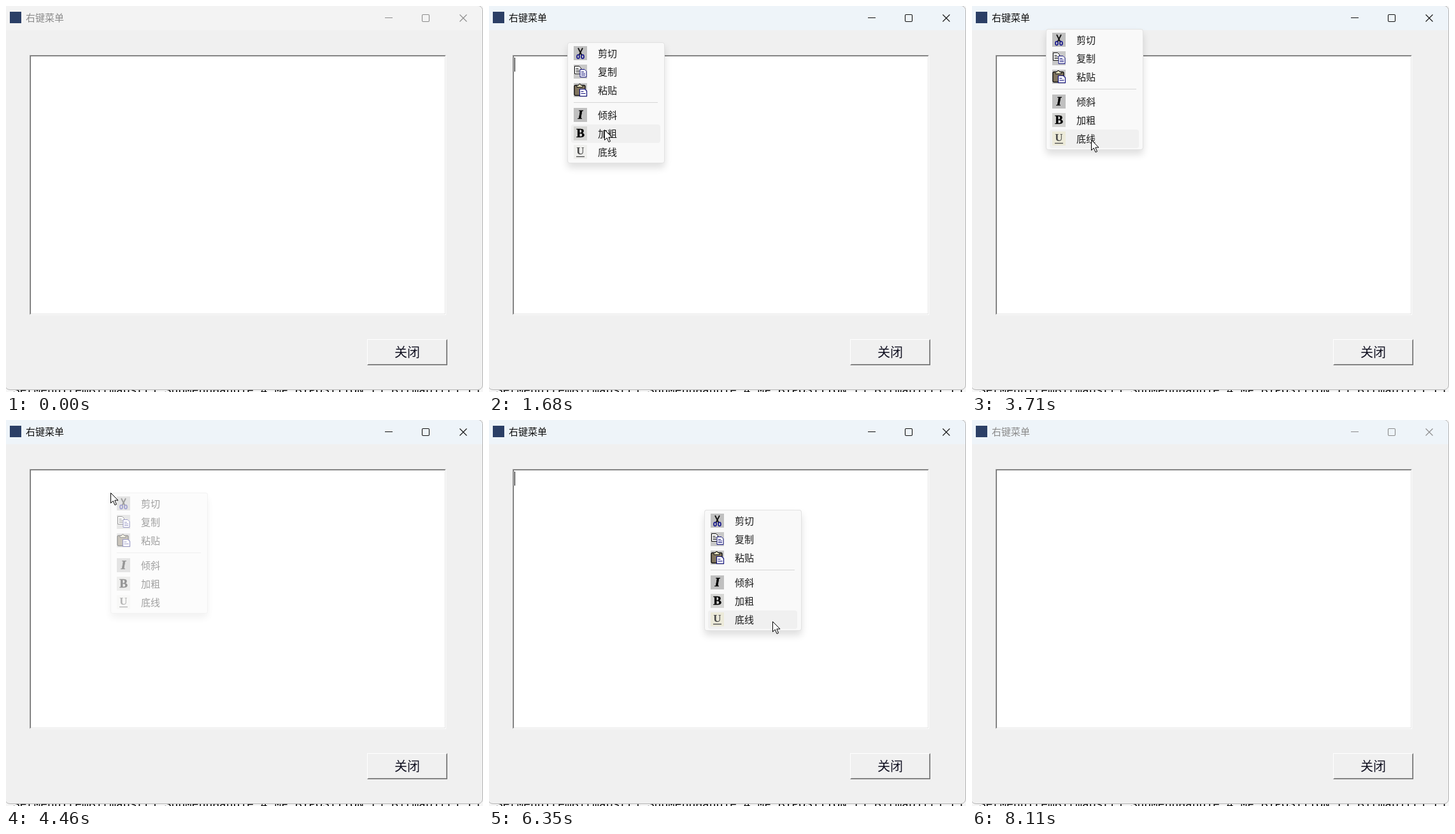
Recreate the animation shown at these times as an HTML page. Size 749 by 606 pixels, loop 8190 ms.

```html
<!DOCTYPE html>
<html lang="zh-CN">
<head>
<meta charset="utf-8">
<title>右键菜单</title>
<style>
html, body { margin: 0; width: 100%; height: 100%; overflow: hidden; background: #f6f6f6; }
body { position: relative; font: 15px "Noto Sans CJK SC", "Noto Sans CJK", sans-serif; color: #111; }
body * { box-sizing: border-box; }
.abs, .row, #menu, #caret, #ptr { position: absolute; }
#code { left: 11px; top: 594px; font: 18px/20px "Liberation Mono", monospace; white-space: pre; color: #000; }
#win { left: -2px; top: -1px; width: 751px; height: 604px; background: #f0f0f0; border: 1px solid #b4b4b4;
  border-radius: 0 8px 8px 8px; overflow: hidden; }
#bar { left: 0; top: 0; width: 100%; height: 38px; background: #eef4f9; }
#name { left: 31px; top: 6px; line-height: 24px; }
#icon { left: 6px; top: 9px; width: 18px; height: 18px; background: #2b3f66; }
#ctl { left: 590px; top: 8px; }
.off { color: #8b8b8b; }
#edit { left: 37px; top: 77px; width: 654px; height: 408px; border: 1px solid; border-color: #a0a0a0 #fff #fff #a0a0a0; }
#edit div { height: 100%; background: #fff; border: 1px solid; border-color: #696969 #e3e3e3 #e3e3e3 #696969; }
#btn { left: 567px; top: 523px; width: 126px; height: 41px; border: 1px solid; border-color: #fff #696969 #696969 #fff; }
#btn div { height: 100%; border: 1px solid; border-color: #f0f0f0 #a0a0a0 #a0a0a0 #f0f0f0;
  font: 300 20px/36px "Noto Sans CJK SC", "Noto Sans CJK", sans-serif; text-align: center; color: #101020; }
#caret { left: 40px; top: 81px; width: 1px; height: 22px; background: #000; }
#menu { left: 0; top: 0; width: 153px; height: 190px; background: #f9f9f9; border-radius: 4px;
  box-shadow: inset 0 0 0 1px #e2e2e2, 0 7px 12px rgba(0,0,0,.13); }
#sep { left: 10px; top: 94px; width: 132px; height: 1px; background: #d6d6d6; }
.row { left: 6px; width: 140px; height: 29px; border-radius: 4px; line-height: 28px; padding-left: 42px; color: #1a1a1a; }
.row svg { position: absolute; left: 4px; top: 3px; }
.row.on { background: #f0f0f0; }
.row.on .warm { fill: #ecead9; }
#menu.ghost { background: none; box-shadow: none; }
.ghost #sep, .ghost .row:not(.on) { visibility: hidden; }
#ptr { left: 0; top: 0; overflow: visible; }
</style>
</head>
<body>
<div id="code" class="abs">SetMenuItemBitmaps(() SubMenuHandle,4,MF_BYPOSITION,() Bitmap1f(),()</div>
<div id="win" class="abs"></div>
<div id="bar" class="abs" style="width:748px;border-radius:0 8px 0 0">
  <div id="icon" class="abs"></div>
  <div id="name" class="abs">右键菜单</div>
  <svg id="ctl" class="abs" width="140" height="22" fill="none" stroke="currentColor" stroke-width="1.1">
    <path d="M5 10.5H17M122.5 5.5l11 11m0-11l-11 11"/>
    <rect x="63.5" y="5.5" width="11" height="11" rx="1.5"/>
  </svg>
</div>
<div id="edit" class="abs"><div></div></div>
<div id="btn" class="abs"><div>关闭</div></div>
<div id="caret"></div>
<div id="menu"><div id="sep" class="abs"></div></div>
<svg id="ptr" width="1" height="1">
  <path id="arrow" d="M.5 .5V16.5L4.2 13L7 19.5L9.5 18.4L6.8 12.1H12Z" fill="#fff" stroke="#000"/>
  <path id="beam" d="M-3 -7.5H-.5M1.5 -7.5H4M.5 -7V7M-3 7.5H-.5M1.5 7.5H4" fill="none" stroke="#000"/>
</svg>
<script>
const LOOP = 8190, FADE = 370, POP = 100;
const $ = id => document.getElementById(id);

const tile = (c, cls = '') => `<rect width="21" height="22" fill="${c}" class="${cls}"/>`;
const glyph = (ch, extra) =>
  `<text x="10.5" y="17" text-anchor="middle" font-family="Liberation Serif, serif" font-weight="bold" font-size="19" ${extra}>${ch}</text>`;
const page = (x, y, c) =>
  `<path d="M${x} ${y}h7l3 3v9h-10z" fill="#fff" stroke="${c}"/><path d="M${x + 2} ${y + 4}h4m-4 2.5h6m-6 2.5h6" stroke="${c}"/>`;

const ITEMS = [
  ['剪切', 3, tile('#c0c0c0') +
    '<path d="M7 3l5.5 11M14 3l-5.5 11" stroke="#111" stroke-width="1.8"/>' +
    '<g fill="none" stroke="#10108a" stroke-width="1.6"><ellipse cx="7" cy="16.5" rx="2" ry="3"/><ellipse cx="14" cy="16.5" rx="2" ry="3"/></g>'],
  ['复制', 32, tile('#c8c8c8') + page(1.5, 2.5, '#111') + page(10, 7.5, '#10107c')],
  ['粘贴', 61, tile('#c8c8c8') +
    '<rect x="1" y="3.5" width="17" height="16" rx="2" fill="#81755f" stroke="#111" stroke-width="1.4"/>' +
    '<path d="M5 6.5v-3h2.500l1-2h2l1 2h2.500v3z" fill="#e4dfbc" stroke="#111"/>' +
    '<path d="M9.500 9.500h8l3 3v8h-11z" fill="#fff" stroke="#10107c" stroke-width="1.2"/><path d="M11.500 13.500h4m-4 3h7" stroke="#10107c"/>'],
  ['倾斜', 100, tile('#c0c0c0') + glyph('I', 'font-style="italic" stroke="#000" stroke-width=".7"')],
  ['加粗', 129, tile('#d6d6d4') + glyph('B', 'stroke="#000" stroke-width=".5"')],
  ['底线', 158, tile('#efefed', 'warm') +
    '<text x="10.5" y="15" text-anchor="middle" font-family="Liberation Serif, serif" font-weight="bold" font-size="17" fill="#4a4a4a">U</text>' +
    '<path d="M4 18.500H17" stroke="#4a4a4a" stroke-width="1.3"/>']
];
const rows = ITEMS.map(([label, top, art]) => {
  const el = document.createElement('div');
  el.className = 'row';
  el.style.top = top + 'px';
  el.innerHTML = `<svg width="22" height="22">${art}</svg>${label}`;
  $('menu').append(el);
  return el;
});

// x, y, opening time, closing time, chosen row
const MENUS = [
  [123, 57, 680, 2390, 2],
  [116, 36, 3215, 3960, 5],
  [164, 114, 4440, 5180, 5],
  [338, 141, 5670, 6420, 5]
];
const CARET = [[620, 2440], [5460, 6520], [7050, 7580]];

// time, x, y of the pointer
const PATH = [
  [120, 690, 596], [600, 123, 57], [700, 123, 57], [880, 242, 211], [1140, 242, 211],
  [1400, 226, 168], [1680, 181, 194], [1810, 181, 194], [1950, 186, 166], [2020, 186, 164],
  [2150, 188, 127], [2350, 188, 127], [2600, 224, 136], [2810, 224, 136], [3170, 116, 36],
  [3250, 116, 36], [3600, 187, 210], [4040, 187, 210], [4390, 164, 114], [4480, 164, 114],
  [4780, 340, 326], [5080, 281, 298], [5340, 281, 298], [5620, 338, 141], [5680, 338, 141],
  [5810, 443, 303], [6010, 443, 303], [6300, 445, 316], [6440, 445, 316], [6770, 605, 517],
  [6840, 605, 517], [7380, 697, 606]
];

function place(t) {
  const i = PATH.findIndex(p => p[0] > t);
  if (i < 1) return null;
  const [t0, x0, y0] = PATH[i - 1], [t1, x1, y1] = PATH[i];
  const u = (t - t0) / (t1 - t0), e = u * u * (3 - 2 * u);
  return [Math.round(x0 + (x1 - x0) * e), Math.round(y0 + (y1 - y0) * e)];
}

function drawMenu(t, pos) {
  const m = MENUS.find(m => t >= m[2] && t < m[3] + FADE), el = $('menu');
  el.style.display = m ? '' : 'none';
  if (!m) return false;
  const [x, y, open, close, pick] = m, ghost = t >= close;
  el.style.transform = `translate(${x}px,${y}px)`;
  el.style.opacity = ghost ? 1 - (t - close) / FADE : Math.min(1, (t - open + 20) / POP);
  el.className = ghost ? 'ghost' : '';
  rows.forEach((row, i) => {
    const dx = pos[0] - x, dy = pos[1] - y - ITEMS[i][1];
    const over = dx > 5 && dx < 147 && dy >= 0 && dy < 29;
    row.classList.toggle('on', ghost ? i === pick : over);
  });
  return !ghost;
}

function draw(t) {
  const pos = place(t), active = t >= 620 && t < 8110;
  $('bar').style.backgroundColor = t < 620 ? '#f3f3f3' : '#eef4f9';
  $('name').classList.toggle('off', !active);
  $('ctl').classList.toggle('off', !active);
  $('caret').style.display = CARET.some(([a, b]) => t >= a && t < b) ? '' : 'none';
  const modal = drawMenu(t, pos || [0, 0]);
  $('ptr').style.display = pos ? '' : 'none';
  if (!pos) return;
  const [x, y] = pos;
  const inEdit = !modal && x > 38 && x < 689 && y > 78 && y < 484;
  $('ptr').style.transform = `translate(${x}px,${y}px)`;
  $('arrow').style.display = inEdit ? 'none' : '';
  $('beam').style.display = inEdit ? '' : 'none';
}

const start = performance.now();
function tick() {
  draw((performance.now() - start) % LOOP);
  requestAnimationFrame(tick);
}
tick();
</script>
</body>
</html>
```
